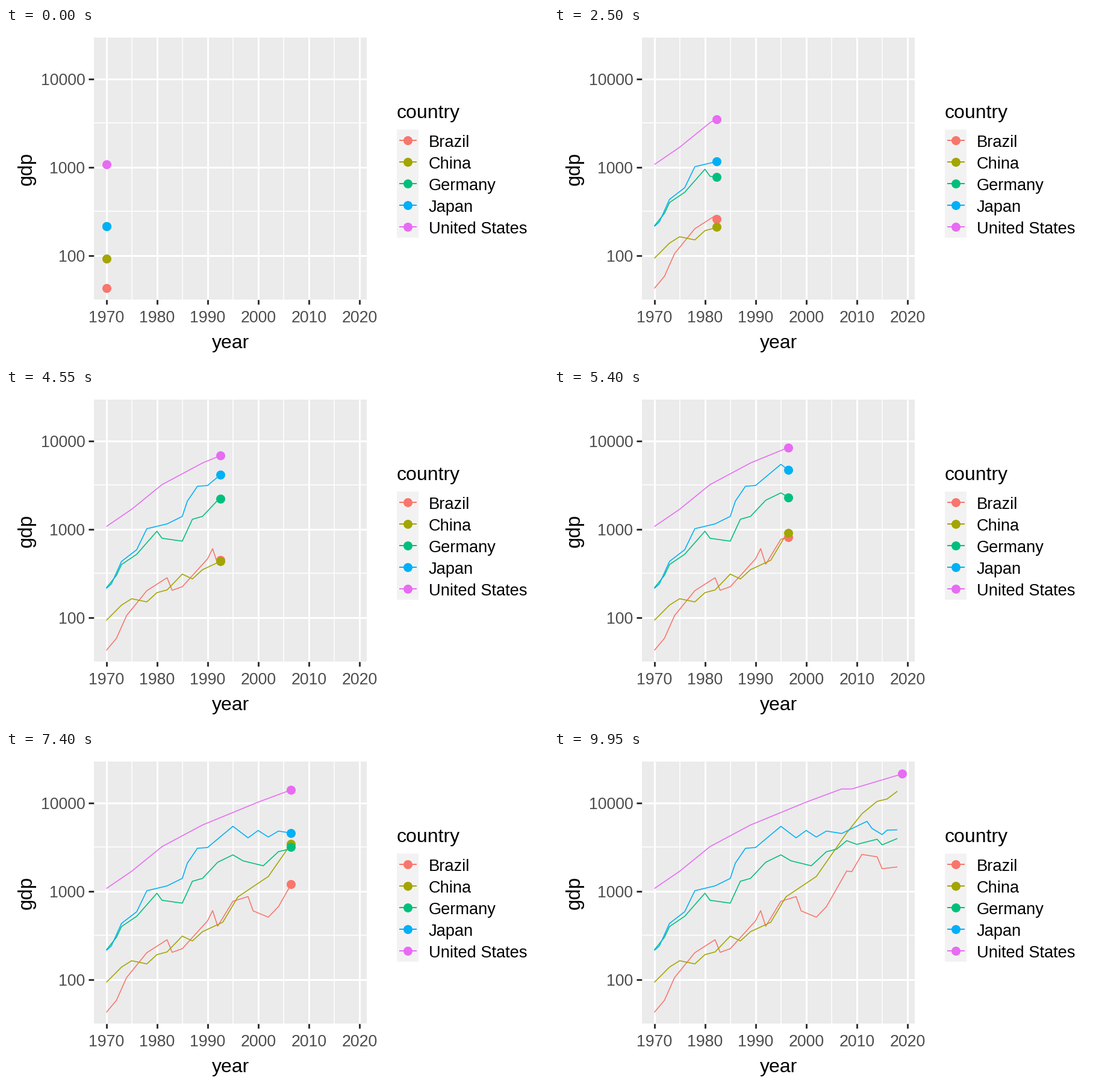
A matplotlib script for the animation above (10000 ms loop, 900x556 px).

```python
import numpy as np
import matplotlib.pyplot as plt
from matplotlib.animation import FuncAnimation
from matplotlib.patches import Rectangle

W, H, DPI = 900, 556, 100
FRAMES, INTERVAL = 200, 50
PT = 72 / DPI  # points per pixel
START, END = 1970, 2019
LEFT, RIGHT, TOP, BOTTOM = 146, 599, 16, 452
GREY, DARK = "#4D4D4D", "#333333"

plt.rcParams["font.family"] = "Liberation Sans"

# Turning points: years after START -> GDP in billions of dollars.
# Growth between them is exponential, so straight on the log scale.
COUNTRIES = [
    ("Brazil", "#F8766D",
     {0: 42.3, 2: 58, 4: 105, 8: 201, 12: 282, 13: 203, 15: 223, 20: 462,
      21: 603, 22: 401, 25: 769, 28: 870, 29: 599, 32: 508, 34: 669,
      38: 1696, 39: 1667, 41: 2616, 44: 2456, 45: 1802, 48: 1886}),
    ("China", "#A3A500",
     {0: 92.6, 3: 138, 5: 163, 8: 150, 10: 191, 12: 205, 15: 310, 17: 273,
      19: 348, 23: 445, 26: 864, 32: 1470, 38: 4594, 41: 7552, 44: 10439,
      46: 11138, 48: 13608}),
    ("Germany", "#00BF7D",
     {0: 216, 2: 300, 3: 398, 6: 520, 10: 950, 11: 790, 15: 733, 17: 1298,
      19: 1399, 22: 2132, 25: 2586, 27: 2212, 31: 1944, 34: 2809, 36: 2995,
      38: 3745, 40: 3400, 44: 3889, 45: 3358, 48: 3964}),
    ("Japan", "#00B0F6",
     {0: 213, 1: 240, 3: 432, 6: 586, 8: 1014, 12: 1150, 15: 1399, 16: 2079,
      18: 3072, 20: 3133, 25: 5449, 28: 4033, 30: 4888, 32: 4115, 34: 4815,
      37: 4515, 42: 6203, 43: 5156, 45: 4395, 46: 4940, 48: 4971}),
    ("United States", "#E76BF3",
     {0: 1073, 5: 1685, 11: 3207, 19: 5642, 30: 10252, 37: 14452,
      39: 14449, 49: 21433}),
]


def px(year):
    return 166.6 + (year - START) * 8.406


def py(power):
    return 231.8 - (power - 3) * 146.8


fig = plt.figure(figsize=(W / DPI, H / DPI), dpi=DPI, facecolor="white")
ax = fig.add_axes([0, 0, 1, 1])
ax.set_xlim(0, W)
ax.set_ylim(H, 0)
ax.axis("off")


def stroke(xs, ys, color, width, z=1):
    return ax.plot(xs, ys, color=color, lw=width * PT, zorder=z,
                   solid_capstyle="butt", solid_joinstyle="round")[0]


def dot(x, y, color, z=5):
    return ax.plot([x], [y], "o", color=color, ms=15 * PT, mew=0, zorder=z)[0]


def label(x, y, text, size, color="black", ha="left", rotation=0):
    ax.text(x, y, text, fontsize=size * PT, color=color, ha=ha,
            va="baseline", rotation=rotation, rotation_mode="anchor")


def box(x, y, w, h, color):
    ax.add_patch(Rectangle((x, y), w, h, fc=color, lw=0, zorder=0))


def draw_axes():
    box(LEFT, TOP, RIGHT - LEFT, BOTTOM - TOP, "#EBEBEB")
    for year in range(1975, 2020, 10):
        stroke([px(year)] * 2, [TOP, BOTTOM], "white", 1.5)
    for power in (2.5, 3.5):
        stroke([LEFT, RIGHT], [py(power)] * 2, "white", 1.5)
    for year in range(1970, 2021, 10):
        x = px(year)
        stroke([x, x], [TOP, BOTTOM], "white", 3, 2)
        stroke([x, x], [BOTTOM, BOTTOM + 8], DARK, 3)
        label(x, 490, str(year), 26.7, GREY, "center")
    for power in (2, 3, 4):
        y = py(power)
        stroke([LEFT, RIGHT], [y, y], "white", 3, 2)
        stroke([LEFT - 9, LEFT], [y, y], DARK, 3)
        label(131.3, y + 10.3, str(10 ** power), 26.7, GREY, "right")
    label(373.2, 532.5, "year", 32, ha="center")
    label(43, 234.5, "gdp", 33, ha="center", rotation=90)


def draw_legend():
    label(648.5, 150, "country", 32)
    box(649, 169, 36, 180, "#F2F2F2")
    for i, (name, color, _) in enumerate(COUNTRIES):
        y = 187.4 + 36 * i
        stroke([652.7, 682], [y, y], color, 2, 4)
        dot(667.4, y, color)
        label(701.8, y + 10.4, name, 27.2)


draw_axes()
draw_legend()

# Each year lands on a whole frame; motion is linear in between
years = np.arange(START, END + 1)
year_frames = np.round((years - START) * (FRAMES - 1) / (END - START))

series = []
for i, (_, color, points) in enumerate(COUNTRIES):
    line = stroke([], [], color, 1.6, 4 + i / 10)
    head = dot(0, 0, color, 5 + i / 10)
    knots = START + np.array(list(points))
    series.append((knots, np.log10(list(points.values())), line, head))


def update(frame):
    now = np.interp(frame, year_frames, years)
    for knots, powers, line, head in series:
        tip = min(now, knots[-1])
        tip_power = np.interp(tip, knots, powers)
        past = knots < tip
        line.set_data(px(np.append(knots[past], tip)),
                      py(np.append(powers[past], tip_power)))
        head.set_data([px(tip)], [py(tip_power)])
        head.set_visible(bool(now <= knots[-1]))
    return [artist for s in series for artist in s[2:]]


anim = FuncAnimation(fig, update, frames=FRAMES, interval=INTERVAL,
                     repeat=True, repeat_delay=0)
plt.show()
```
